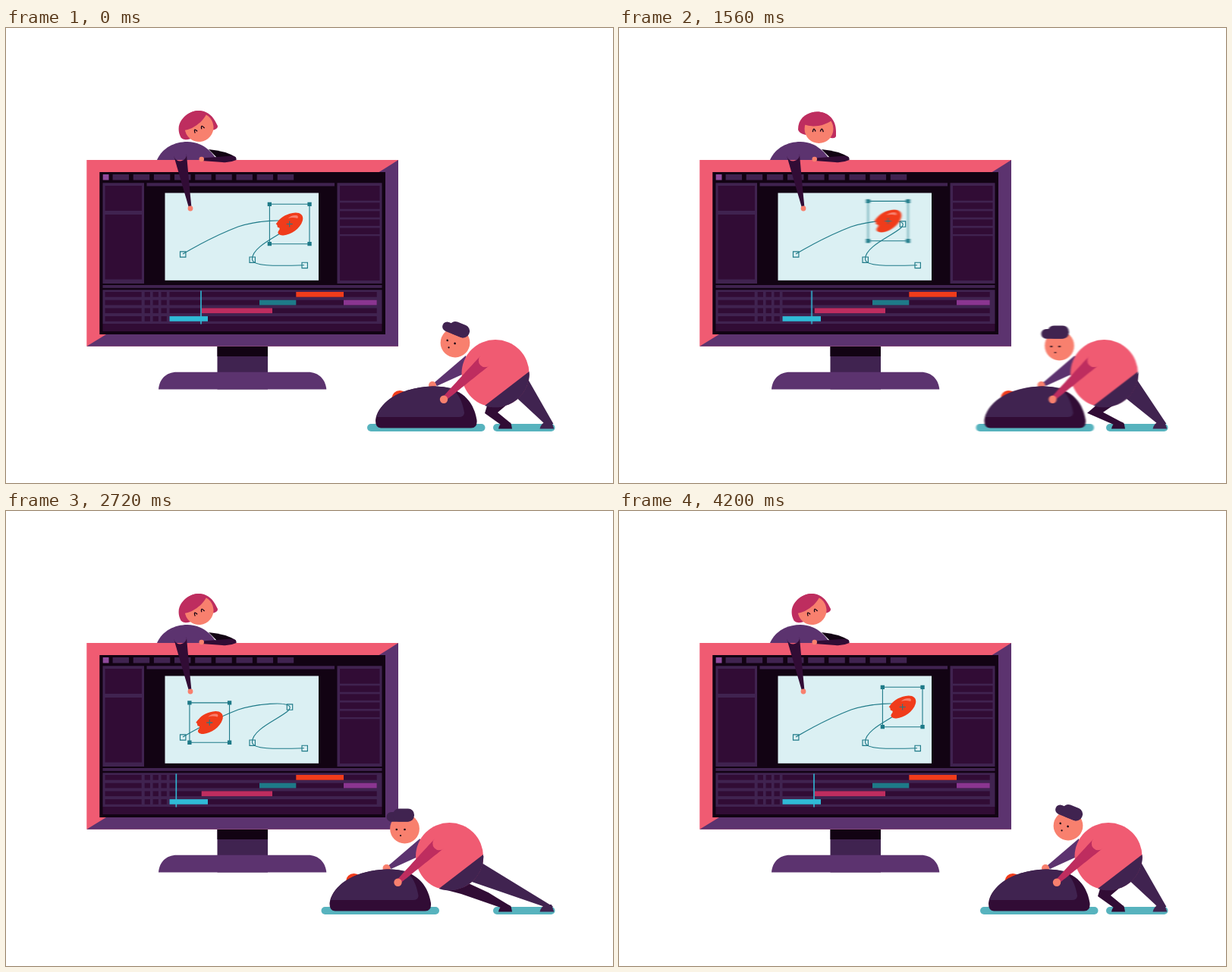
An HTML page that plays this animation: 800x600 px, repeating every 4.24 s.

```html
<!DOCTYPE html>
<html lang="en">
<head>
<meta charset="utf-8">
<title>Scrubbing the timeline</title>
<style>
  html, body { margin: 0; width: 100%; height: 100%; overflow: hidden; background: #fff; }
  svg { display: block; width: 800px; height: 600px; }
</style>
</head>
<body>
<svg viewBox="0 0 800 600" xmlns="http://www.w3.org/2000/svg">
  <defs>
    <filter id="blurMan" filterUnits="userSpaceOnUse" x="0" y="0" width="800" height="600" color-interpolation-filters="sRGB"><feGaussianBlur/></filter>
    <filter id="blurBall" filterUnits="userSpaceOnUse" x="-60" y="-60" width="120" height="120" color-interpolation-filters="sRGB"><feGaussianBlur/></filter>
    <filter id="blurHead" filterUnits="userSpaceOnUse" x="-60" y="-60" width="120" height="120" color-interpolation-filters="sRGB"><feGaussianBlur/></filter>
  </defs>

  <!-- woman behind the monitor -->
  <path fill="#5c336f" d="M199 174C206 158 222 150 239 150C254 150 268 158 278 174Z"/>
  <g id="womanHead">
    <path fill="#be2d5f" d="M236 134C236 118 248 110.500 261 110.500C275 110.500 286 120 286 136L286 143Q284 147 276 144L246 141Q237 139 236 134Z"/>
    <circle cx="263.500" cy="133" r="19" fill="#f8806e"/>
    <path fill="#be2d5f" d="M243 127Q262 134 281.500 121.500C275 112 268 110.500 261 110.500C249 110.500 242 118 243 127Z"/>
    <path fill="none" stroke="#120313" stroke-width="1.300" d="M255.300 137.200Q256.500 129.500 259 136.500M265.300 136.500Q267.500 129.500 269.300 137.200"/>
  </g>

  <!-- monitor -->
  <path fill="#402350" d="M278.500 420H345V476.500H278.500Z"/>
  <path fill="#120313" d="M278.500 420H345V433H278.500Z"/>
  <path fill="#5c336f" d="M201 476.500C202 463 211 453.700 225 453.700H398C412 453.700 421 463 422.300 476.500Z"/>
  <path fill="#f05b72" d="M106.300 174H517V419.700H106.300Z"/>
  <path fill="#5c336f" d="M517 174L490 191V403L132 404L106.300 419.700H517Z"/>
  <g id="screen"></g>

  <!-- motion path and the dragged shape -->
  <g fill="none" stroke="#1e7a88" stroke-width="1.150">
    <path id="rail" stroke="none" d="M233 298C262 281 285 270 306 262C330 254 370 251 374 258"/>
    <path d="M233 298C262 281 285 270 306 262C330 254 370 251 374 258C378 268 324 284 324.500 305C325 314 352 314 393 312.700"/>
    <path d="M229.500 294.800h7.400v7.400h-7.400zM370.300 254.800h7.400v7.400h-7.400zM321 302h7.400v7.400h-7.400zM390 309.200h7.400v7.400h-7.400z"/>
  </g>
  <g id="ball">
    <path fill="#f03c1b" d="M-18 0C-12 -9 -4 -14 8 -15C16 -15 19 -10 17 -4C14 6 2 14 -8 15C-13 15 -17 13 -14.500 9C-12 6 -13 5 -15 4.500C-17 4 -15 1 -18 0Z"/>
    <path fill="#f8806e" d="M-2 -7.500Q3 -12.500 10 -11.300Q12 -10 10.500 -7.500Q4 -9.500 -2 -7.500Z"/>
    <path fill="none" stroke="#1e7a88" stroke-width="1.100" d="M-26.300 -26.200H26.300V26.200H-26.300ZM-4 0H4M0 -4V4"/>
    <path fill="#1e7a88" d="M-29 -28.800h5.300v5.300h-5.300zM23.700 -28.800h5.300v5.300h-5.300zM-29 23.500h5.300v5.300h-5.300zM23.700 23.500h5.300v5.300h-5.300z"/>
  </g>
  <path id="playhead" stroke="#30bad6" d="M0 346.500V390.500"/>

  <!-- woman's arms -->
  <path fill="#120313" d="M267 160Q290 162 303 170.500L300 174L278 171Z"/>
  <path fill="#310c35" d="M258 171.500L299 168.500Q304.500 170 303.500 174Q295 178 285 177L258 175Z"/>
  <circle cx="257.700" cy="173" r="3.300" fill="#f8806e"/>
  <path id="womanArm" fill="#310c35"/>
  <circle id="womanHand" r="3.400" fill="#f8806e"/>

  <!-- man pushing the mouse -->
  <rect x="642" y="522" width="81.500" height="10" rx="5" fill="#57b3be"/>
  <path id="farLeg" fill="#310c35"/>
  <path id="nearLeg" fill="#402350"/>
  <path fill="#310c35" d="M649 528.500Q650 521 658 519.500Q666 519 666 523L667 528.500Z"/>
  <path fill="#402350" d="M703.500 528.500Q705 521 712 519L719 519L722.300 528.500Z"/>
  <g id="man">
    <g id="pusher">
      <rect x="476" y="522" width="155.500" height="10" rx="5" fill="#57b3be"/>
      <g id="farArm">
        <path fill="#5c336f" d="M606 432L612 452L568 472L564 468Z"/>
        <circle cx="562" cy="471" r="5" fill="#f8806e"/>
      </g>
      <circle cx="519" cy="488.500" r="10.500" fill="#f03c1b"/>
      <path fill="#310c35" d="M487 518C488 498 515 474 562 472.500C598 472 616 490 620.500 517Q621.500 527.500 613 527.500L494 527.500Q487 527 487 518Z"/>
      <path fill="#402350" d="M488.300 513C494 492 520 474 562 472.500Q576 472 587 475Q600 484 604 507Q604 513 597 513Z"/>
      <circle cx="645" cy="455.500" r="44.500" fill="#f05b72"/>
      <path fill="#402350" d="M631 498L689.500 453A44.500 44.500 0 0 1 631 498Z"/>
      <path id="nearArm" fill="#be2d5f"/>
      <circle cx="577" cy="489.700" r="5.200" fill="#f8806e"/>
      <g id="manHead">
        <circle r="19.400" fill="#f8806e"/>
        <rect x="-24" y="-22" width="34" height="12.700" rx="6.300" fill="#402350"/>
        <rect x="-15.500" y="-26.500" width="28" height="17" rx="8" fill="#402350"/>
        <g id="eyes" fill="#120313"><circle cx="-10.700" cy="0" r="1.300"/><circle cx="0" cy="0" r="1.300"/></g>
        <circle cx="-5.500" cy="9" r="1.100" fill="#120313"/>
      </g>
    </g>
  </g>
</svg>
<script>
const LOOP = 4240, STEP = 40;
const $ = id => document.getElementById(id);
const set = (id, attrs) => { for (const k in attrs) $(id).setAttribute(k, attrs[k]); };
const lerp = (a, b, p) => a + (b - a) * p;
const ease = (t, a, b) => {
  const p = Math.min(1, Math.max(0, (t - a) / (b - a)));
  return p < .5 ? 4 * p ** 3 : 1 - 4 * (1 - p) ** 3;
};
const bump = (t, a, b) => t > a && t < b ? Math.sin(Math.PI * (t - a) / (b - a)) : 0;

// Smooth curve through [time, value] points, flat at turns and ends.
function curve(points) {
  const slope = i => {
    const a = points[i - 1], b = points[i], c = points[i + 1];
    if (!a || !c || (b[1] - a[1]) * (c[1] - b[1]) <= 0) return 0;
    return (c[1] - a[1]) / (c[0] - a[0]);
  };
  return t => {
    if (t <= points[0][0]) return points[0][1];
    const i = points.findIndex(p => p[0] >= t);
    if (i < 0) return points[points.length - 1][1];
    const [t0, v0] = points[i - 1], [t1, v1] = points[i], d = t1 - t0, p = (t - t0) / d;
    const q = p * p * (3 - 2 * p);
    return lerp(v0, v1, q) + d * p * (1 - p) * ((1 - p) * slope(i - 1) - p * slope(i));
  };
}

const mouseShift = curve([[1460, 0], [1560, -5.5], [1680, -33], [1800, -52], [1900, -58.5], [2000, -60.5],
  [2720, -60.5], [2850, -66], [3000, -55], [3120, -34], [3240, -17], [3360, -6], [3520, 0]]);
const railEnd = $('rail').getTotalLength(), railRest = 40.5;
const ballTravel = curve([[1440, railEnd], [1560, railEnd - 20], [1680, railEnd - 62], [1800, railEnd - 94], [2000, railRest],
  [2720, railRest], [2850, 12], [3000, 25], [3120, 54], [3240, 105], [3360, railEnd - 10], [3480, railEnd]]);

// Shoulder, bend and hand of the waving arm, plus how late it tapers.
const armPoses = [
  [229.5, 167, 236, 202, 243, 238, 1],
  [230, 166, 198, 192, 250, 202, 1.3],
  [234.5, 166, 258, 193, 300, 160, 2.4],
  [232, 166, 240, 204, 284, 208, 1.5]
];
const armKeys = [[280, 0], [620, 1], [1040, 2], [1120, 2], [1300, 3], [1480, 0]];
const armCurves = armPoses[0].map((_, k) => curve(armKeys.map(([t, pose]) => [t, armPoses[pose][k]])));

function limb(sx, sy, cx, cy, hx, hy, taper, r0, r1) {
  const left = [], right = [], n = 24;
  for (let i = 0; i <= n; i++) {
    const p = i / n, q = 1 - p;
    const x = q * q * sx + 2 * p * q * cx + p * p * hx;
    const y = q * q * sy + 2 * p * q * cy + p * p * hy;
    const tx = q * (cx - sx) + p * (hx - cx), ty = q * (cy - sy) + p * (hy - cy);
    const r = lerp(r0, r1, p ** taper) / Math.hypot(tx, ty);
    left.push([x - ty * r, y + tx * r]);
    right.unshift([x + ty * r, y - tx * r]);
  }
  const path = pts => pts.map(p => p.map(v => v.toFixed(2)).join(' ')).join('L');
  return `M${path(left)}L${path(right)}A${r0} ${r0} 0 0 1 ${left[0].join(' ')}Z`;
}

function blur(target, filter, vx, vy) {
  const sx = Math.abs(vx) * .15, sy = Math.abs(vy) * .15;
  if (sx + sy < .08) return $(target).removeAttribute('filter');
  $(filter).firstElementChild.setAttribute('stdDeviation', `${sx.toFixed(2)} ${sy.toFixed(2)}`);
  $(target).setAttribute('filter', `url(#${filter})`);
}

function buildScreen() {
  const ink = '#120313', plum = '#310c35', violet = '#402350';
  let out = '';
  const box = (x0, y0, x1, y1, fill) =>
    out += `<rect x="${x0}" y="${y0}" width="${x1 - x0}" height="${y1 - y0}" fill="${fill}"/>`;
  box(123.3, 190, 500, 404, ink);
  box(127.7, 193, 135.5, 200.5, '#8f4a9c');
  for (let i = 0; i < 9; i++) box(140.6 + i * 27.15, 193, 162 + i * 27.15, 200.5, violet);
  box(127.5, 204.3, 182, 337, violet);
  box(130.5, 208, 179, 241, plum);
  box(130.5, 246, 179, 331.5, plum);
  box(185.5, 204.3, 433, 208.5, violet);
  box(436.5, 204.3, 495.5, 337, violet);
  box(440, 208, 492.5, 227.7, plum);
  for (let i = 0; i < 4; i++) box(440, 230.3 + i * 11.1, 492.5, 238.7 + i * 11.1, plum);
  box(440, 274.3, 492.5, 333, plum);
  box(209.5, 217.5, 412, 332.8, '#dbf0f3');
  box(127.5, 339, 495.5, 342.8, violet);
  box(127.5, 345.3, 495.5, 390, violet);
  box(127.5, 390, 495.5, 400, plum);
  const row = (i, x0, x1, fill) => box(x0, 348 + i * 10.7, x1, 354.7 + i * 10.7, fill);
  for (let i = 0; i < 4; i++) {
    row(i, 130.5, 178.7, plum);
    for (let k = 0; k < 3; k++) row(i, 182.7 + k * 10.9, 190 + k * 10.9, plum);
    row(i, 215.5, 488.7, plum);
  }
  row(0, 382.3, 445, '#f03c1b');
  row(1, 334, 382.3, '#1e7a88');
  row(1, 445, 488.7, '#8a3590');
  row(2, 257.7, 351, '#be2d5f');
  row(3, 215.5, 266, '#30bad6');
  $('screen').innerHTML = out;
}

const kneeOuter = curve([[0, 631], [5.5, 617], [34, 626], [60.5, 600]]);
const kneeInner = curve([[0, 648], [5.5, 638], [34, 645], [60.5, 636]]);

function drawWoman(t) {
  const tilt = 1 - ease(t, 0, 540) + ease(t, 1840, 2220);
  set('womanHead', { transform: `translate(${-9 * tilt} ${-2 * tilt}) rotate(${-28 * tilt} 263.5 133)` });
  const arm = armCurves.map(c => c(t));
  set('womanArm', { d: limb(...arm, 8.5, 1.6) });
  set('womanHand', { cx: arm[4], cy: arm[5] });
}

function drawMan(t) {
  const dx = mouseShift(t), speed = mouseShift(t + 20) - mouseShift(t - 20), u = -dx;
  set('pusher', { transform: `translate(${dx} 0)` });
  blur('man', 'blurMan', speed, 0);
  set('nearLeg', { d: `M${690 + dx} 455L${689 + dx} 465L721.500 522L710 522L${674.5 + dx} 489L${650 + dx} 492Z` });
  set('farLeg', { d: `M${634 + dx} 498L${668 + dx} 490L${kneeInner(u)} ${507 - u * .06}L665 521L652 523L${kneeOuter(u)} ${508 - u * .05}Z` });

  const look = 1 - ease(t, 640, 1080) + ease(t, 3400, 4200);
  set('manHead', { transform: `translate(${586 + 6 * look} ${419 - 4 * look}) rotate(${22 * look})` });
  const blink = Math.max(bump(t, 220, 420), bump(t, 2360, 2560));
  set('eyes', { transform: `translate(0 1) scale(1 ${1 - .8 * blink})` });
  const tap = Math.max(bump(t, 720, 1040), bump(t, 2300, 2680));
  set('farArm', { transform: `rotate(${3 * tap} 608 442)` });

  set('playhead', {
    transform: `translate(${257 + dx * .54} 0)`,
    'stroke-width': 1.6 + Math.abs(speed) * .12,
    'stroke-opacity': 1 / (1 + Math.abs(speed) * .07)
  });
}

function drawBall(t) {
  const at = time => $('rail').getPointAtLength(ballTravel(time));
  const p = at(t), a = at(t - 20), b = at(t + 20);
  set('ball', { transform: `translate(${p.x - .3} ${p.y + .5})` });
  blur('ball', 'blurBall', b.x - a.x, b.y - a.y);
}

function render(time) {
  const t = Math.floor(time % LOOP / STEP) * STEP;
  drawWoman(t);
  drawMan(t);
  drawBall(t);
}

buildScreen();
set('nearArm', { d: limb(631.5, 438.5, 604, 464, 577, 489.5, 1, 8.7, 3) });
function loop() {
  render(performance.now());
  requestAnimationFrame(loop);
}
loop();
</script>
</body>
</html>
```
